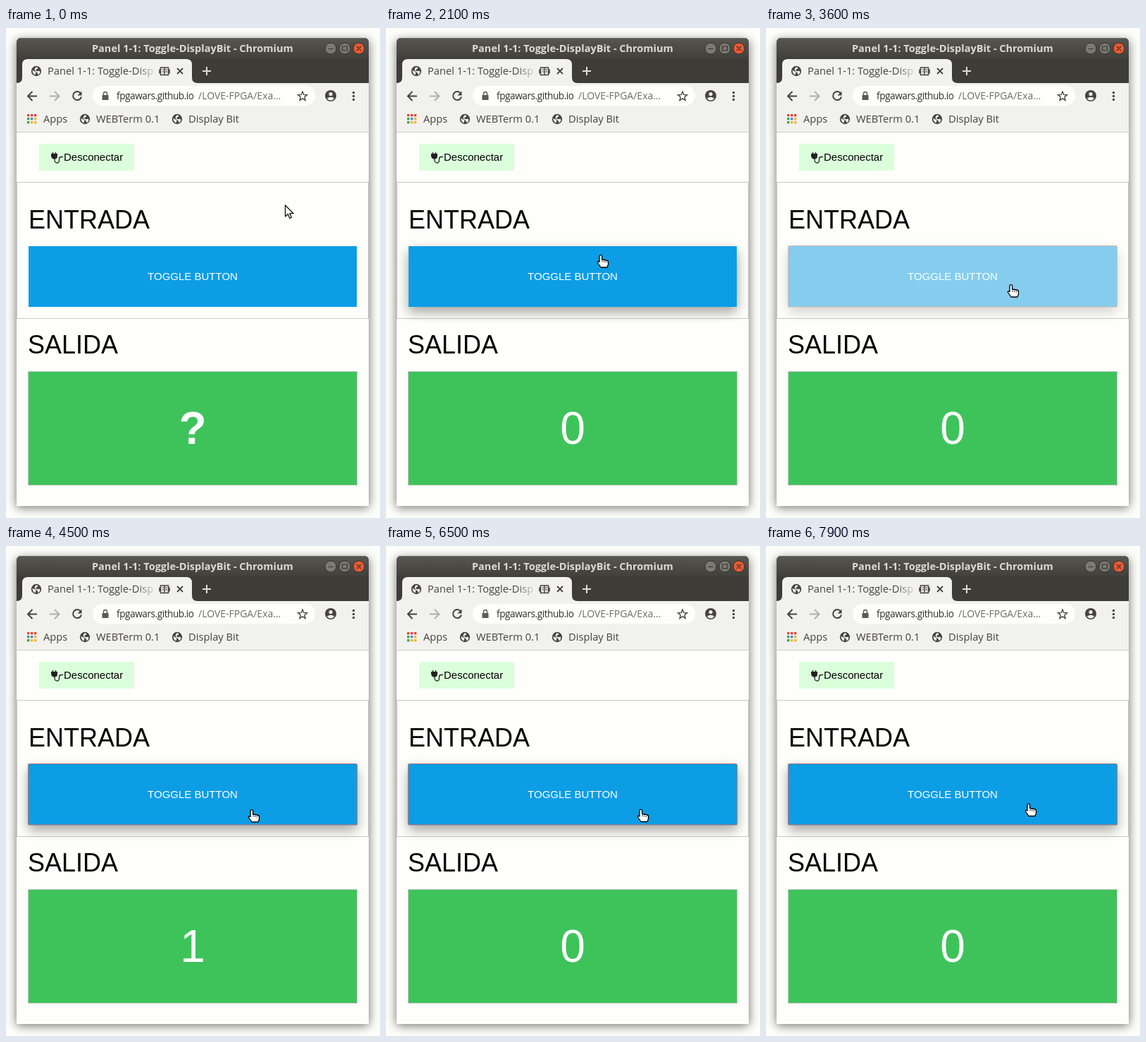
Recreate the animation shown at these times as an HTML page. Size 531 by 694 pixels, loop 8000 ms.

```html
<!DOCTYPE html>
<html lang="es">
<head>
<meta charset="utf-8">
<title>Panel</title>
<style>
html, body { margin: 0; width: 100%; height: 100%; overflow: hidden; background: #fdfdfa; }
svg { display: block; }
.ui { font-family: "Open Sans", "Noto Sans", sans-serif; font-size: 14.7px; fill: #45443f; }
.page { font-family: "Liberation Sans", Arial, sans-serif; font-size: 15px; fill: #000; }
.page .head { font-size: 36px; }
.page .big { font-size: 64px; fill: #fff; }
.line { fill: none; stroke: #45443f; stroke-width: 2; }
</style>
</head>
<body>
<svg width="531" height="694" viewBox="0 0 531 694">
  <defs>
    <linearGradient id="bar" x2="0" y2="1">
      <stop offset="0" stop-color="#575650"/><stop offset="1" stop-color="#403f3a"/>
    </linearGradient>
    <linearGradient id="fade" gradientUnits="userSpaceOnUse" x1="186" x2="214">
      <stop offset="0" stop-color="#45443f"/><stop offset="1" stop-color="#45443f" stop-opacity="0"/>
    </linearGradient>
    <filter id="soft" x="-10%" y="-10%" width="120%" height="120%"><feGaussianBlur stdDeviation="7"/></filter>
    <filter id="blur8" x="-10%" y="-50%" width="120%" height="200%"><feGaussianBlur stdDeviation="8"/></filter>
    <filter id="blur10" x="-10%" y="-50%" width="120%" height="200%"><feGaussianBlur stdDeviation="10"/></filter>
    <g id="globe">
      <circle r="7.2" fill="#45443f"/>
      <path d="M-5.6-1.2L-2.6.6-1.2.8-.6 2.6-1.6 5.6Q-5.4 4-5.6-1.2ZM-1-5.6L2.4-5.2 1.6-3 -.4-2.2-.8-.6 2 .2 4.2-.4 5.6 1.4Q4.8 4.2 2.4 5.3L1.8 2.6-.4 1.2-2.6-1.4-2-3.2Z" fill="#f1f1ee"/>
    </g>
  </defs>

  <rect x="14" y="17" width="502" height="663" rx="6" opacity=".5" filter="url(#soft)"/>
  <path d="M15 677V21q0-7 7-7H508q7 0 7 7V677Z" fill="#fefefb"/>

  <!-- window frame -->
  <path d="M15 78V21q0-7 7-7H508q7 0 7 7V78Z" fill="#3d3c37"/>
  <path d="M15 44V21q0-7 7-7H508q7 0 7 7V44Z" fill="url(#bar)"/>
  <path d="M20 14.5H510" stroke="#706f68"/>
  <text class="ui" x="122" y="34" style="font-size:14.5px;font-weight:700;fill:#dfdbd2">Panel 1-1: Toggle-DisplayBit - Chromium</text>
  <g stroke="#33322e">
    <circle cx="461" cy="29" r="8" fill="#7b7a72"/>
    <circle cx="481" cy="29" r="8" fill="#7b7a72"/>
    <circle cx="501" cy="29" r="8" fill="#ea5a33"/>
    <path d="M457.500 29.500h7M477.500 26h7v6h-7ZM498 26l6 6m0-6l-6 6" fill="none" stroke-width="1.200"/>
  </g>

  <!-- tab strip and toolbar -->
  <path d="M15 78q8 0 8-8V52q0-8 8-8H256q8 0 8 8V70q0 8 8 8H515V147H15Z" fill="#f1f1ee"/>
  <path d="M15 147.500H515" stroke="#cfcecb"/>
  <use href="#globe" x="43" y="61"/>
  <text class="ui" x="59" y="66" style="fill:url(#fade)">Panel 1-1: Toggle-Disp</text>
  <g class="line" stroke-width="1.500">
    <path d="M219.500 56H230.500V66.500H219.500ZM225 56V66M222 59h1.500M222 62h1.500M226.500 59h2M226.500 62h2M218 58.500v6M232 58.500v6" style="stroke-width:1.500"/>
    <path d="M243 57l8 8m0-8l-8 8" style="stroke-width:1.800"/>
    <path d="M279 61h12M285 55v12" style="stroke:#dedcd5"/>
    <path d="M44 96.500H31.500M37.500 90l-6.500 6.500 6.500 6.500"/>
    <path d="M62 96.500H75M69 90l6.500 6.500-6.500 6.500" style="stroke:#b1b0ac"/>
    <path d="M106 92.500A6 6 0 1 0 107 97.500"/>
    <path d="M107.500 89.500v6h-6Z" style="fill:#45443f;stroke:none"/>
  </g>
  <rect x="123" y="82" width="316" height="28" rx="14" fill="#fefefc"/>
  <path d="M136.500 95h9v7h-9Z" fill="#5b5a56"/>
  <path class="line" d="M138.500 95v-2a2.500 2.500 0 0 1 5 0v2" style="stroke:#5b5a56;stroke-width:1.400"/>
  <text class="ui" x="157" y="101" style="font-size:13.600px;letter-spacing:-.45px;fill:#2f2e2a">fpgawars.github.io</text>
  <text class="ui" x="273" y="101" style="font-size:14px;fill:#6d6c68">/LOVE-FPGA/Exa…</text>
  <path class="line" d="M421 90l1.800 4.400 4.700.4-3.600 3 1.100 4.600-4-2.500-4 2.500 1.100-4.600-3.600-3 4.700-.4Z" style="stroke-width:1.400"/>
  <circle cx="461" cy="96" r="8" fill="#45443f"/>
  <circle cx="461" cy="93.500" r="2.600" fill="#f1f1ee"/>
  <path d="M455.800 99.800q5.200-4.200 10.400 0-2 2.800-5.200 2.800t-5.200-2.800Z" fill="#f1f1ee"/>
  <g fill="#45443f"><circle cx="493.500" cy="91.500" r="1.700"/><circle cx="493.500" cy="96.500" r="1.700"/><circle cx="493.500" cy="101.500" r="1.700"/></g>

  <!-- bookmarks -->
  <g id="dots"></g>
  <text class="ui" x="53" y="134">Apps</text>
  <use href="#globe" x="112" y="129"/>
  <text class="ui" x="128" y="134">WEBTerm 0.1</text>
  <use href="#globe" x="243" y="129"/>
  <text class="ui" x="259" y="134">Display Bit</text>

  <!-- page -->
  <g class="page">
    <rect x="47" y="164" width="135" height="38" fill="#dbffdb"/>
    <path d="M64 178h9v3q0 4-3 4.500h-2.500q-3-.5-3.500-4.500Z" fill="#222"/>
    <path class="line" d="M66.500 176v3M70.500 176v3M69 185v2.500q.5 3.500 3.500 3.500t3-3.500v-2q0-3 3-3H81" style="stroke:#222;stroke-width:1.300"/>
    <text x="82" y="188">Desconectar</text>
    <rect x="15.500" y="218.500" width="499" height="193" fill="none" stroke="#c8c8c5"/>
    <text class="head" x="32" y="284">ENTRADA</text>
    <g id="button">
      <g id="shadow">
        <rect x="32" y="317" width="466" height="86" opacity=".2" filter="url(#blur8)"/>
        <rect x="32" y="315" width="466" height="86" opacity=".19" filter="url(#blur10)"/>
      </g>
      <rect x="32" y="309" width="466" height="86" fill="#0c9de5"/>
      <text x="265" y="357" text-anchor="middle" fill="#fff">TOGGLE BUTTON</text>
      <rect id="ring" x="31.500" y="308.500" width="467" height="86.500" rx="2" fill="none" stroke="#b5756f" stroke-width="1.200"/>
    </g>
    <text class="head" x="31" y="461">SALIDA</text>
    <rect x="31.500" y="486.500" width="467" height="161" fill="#3ec35b" stroke="#c2c8c0"/>
    <text id="output" class="big" x="265" y="589" text-anchor="middle"></text>
  </g>

  <g id="arrow" stroke-linejoin="round">
    <path d="M0 0V16L3.800 12.600 6.300 18.400 8.800 17.300 6.400 11.700H11.500Z" fill="#fff" stroke="#111" stroke-width="1.300"/>
  </g>
  <g id="hand" stroke="#000" stroke-linejoin="round">
    <path d="M-2 1.500a1.800 1.800 0 0 1 3.600 0V6l6.500 1q2.400.5 2.400 2.600V13l-1.500 4H0L-4.500 10.500Q-5 8.500-3 8.600L-2 9.600Z" fill="#fff" stroke-width="1.300"/>
    <path d="M2 7.500v2M4.700 8v2M7.300 8.500v2" stroke-width=".9"/>
  </g>
</svg>
<script>
const LOOP = 8000, STEP = 100;
const el = id => document.getElementById(id);
const show = (id, on) => el(id).setAttribute("visibility", on ? "visible" : "hidden");

// pointer path: time, x, y
const path = [
  [0, 396.5, 251], [1400, 396.5, 251], [1500, 386.5, 244], [1700, 354, 242],
  [1900, 322, 272], [2100, 305, 322], [2200, 303, 337], [2300, 303, 337],
  [2500, 330, 352], [2700, 348, 365], [3500, 348, 365], [3600, 348, 364],
  [4200, 348, 364], [4500, 349, 374], [4600, 349, 374], [4800, 357, 418],
  [5400, 357, 418], [5600, 363, 394], [5700, 363, 394], [5900, 361, 374],
  [6400, 361, 374], [6500, 362, 373.5], [6600, 362, 373.5], [6700, 362, 374.5],
  [6900, 362, 374.5], [7300, 366, 421], [7600, 366, 421], [7900, 373, 365.5],
  [8000, 373, 365.5]
];

function pointer(t) {
  const i = path.findIndex(k => k[0] > t);
  const [t0, x0, y0] = path[i - 1], [t1, x1, y1] = path[i];
  const p = (t - t0) / (t1 - t0);
  return [x0 + (x1 - x0) * p, y0 + (y1 - y0) * p];
}

function draw(time) {
  const t = Math.floor(time % LOOP / STEP) * STEP;
  const [x, y] = pointer(t);
  const over = y >= 309 && y < 395;
  for (const id of ["arrow", "hand"]) {
    el(id).setAttribute("transform", `translate(${x} ${y})`);
    show(id, over === (id === "hand"));
  }
  show("shadow", over);
  show("ring", t >= 3600);
  el("button").setAttribute("opacity", t === 3600 ? 0.5 : 1);
  const value = t < 500 ? "?" : t >= 3700 && t < 6500 ? "1" : "0";
  el("output").textContent = value;
  el("output").setAttribute("font-weight", value === "?" ? 700 : 400);
}

const hues = ["#e0453a", "#e0453a", "#e0453a", "#36a355", "#4285e8", "#f0b52c", "#36a355", "#f0b52c", "#f0b52c"];
el("dots").innerHTML = hues.map((c, i) =>
  `<rect x="${30 + i % 3 * 5}" y="${122 + Math.floor(i / 3) * 5}" width="3.300" height="3.300" fill="${c}"/>`).join("");

const start = performance.now();
function tick() {
  draw(performance.now() - start);
  requestAnimationFrame(tick);
}
tick();
</script>
</body>
</html>
```
